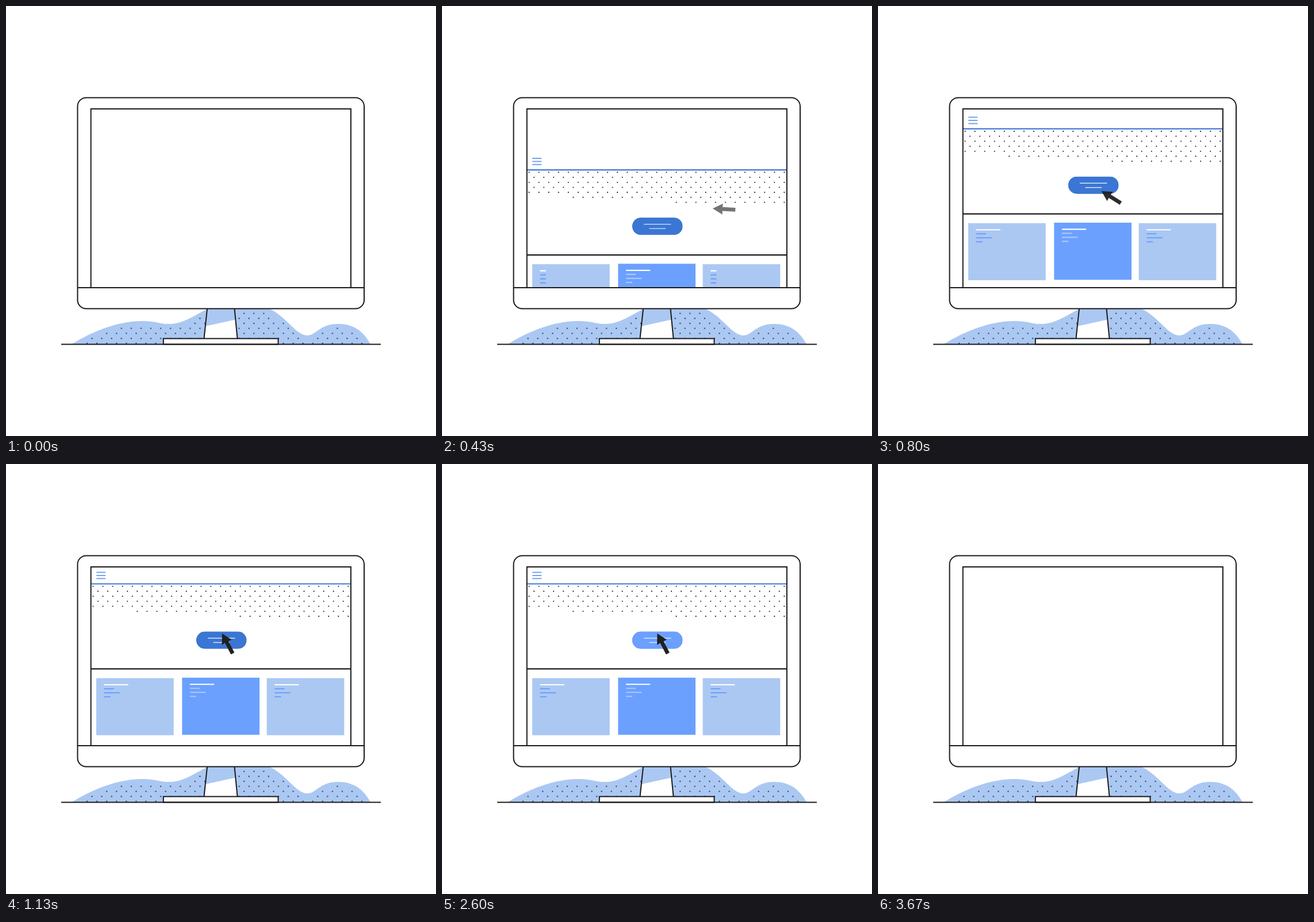
An HTML page with a canvas for the animation above (4.63 s loop, 748 by 748 pixels).

```html
<!DOCTYPE html>
<html lang="en">
<head>
<meta charset="utf-8">
<title>Desktop page</title>
<style>
  html, body { margin: 0; width: 100%; height: 100%; overflow: hidden; background: #fff; }
  canvas { display: block; width: 100vw; height: 100vh; }
</style>
</head>
<body>
<canvas id="stage" width="748" height="748"></canvas>
<script>
const ctx = document.getElementById('stage').getContext('2d');
const LOOP = 4630;
const INK = '#1a1a1a', PALE = '#abc8f3', BLUE = '#6ba0ff', DEEP = '#3b76d4';
const PITCH = 17.07, ROW = 8.7;

const HILLS = 'M115 588C150 566 195 548 237 548C262 548 268 554 288 553C312 551 330 537 350 527' +
  'L459 527C488 541 505 573 524 573C540 573 545 553 578 553C610 553 625 572 634 588Z';
const hills = new Path2D(HILLS);

const clamp = x => Math.max(0, Math.min(1, x));
const span = (t, from, to) => clamp((t - from) / (to - from));
const mix = (a, b, k) => a + (b - a) * k;

function line(x1, y1, x2, y2, color = INK, width = 2, cap = 'butt') {
  ctx.strokeStyle = color;
  ctx.lineWidth = width;
  ctx.lineCap = cap;
  ctx.beginPath();
  ctx.moveTo(x1, y1);
  ctx.lineTo(x2, y2);
  ctx.stroke();
}

function rect(x, y, w, h, color) {
  ctx.fillStyle = color;
  ctx.fillRect(x, y, w, h);
}

function poly(points, color) {
  ctx.fillStyle = color;
  ctx.beginPath();
  points.forEach(([x, y]) => ctx.lineTo(x, y));
  ctx.closePath();
  ctx.fill();
}

function roundRect(x, y, w, h, r) {
  ctx.beginPath();
  ctx.roundRect(x, y, w, h, r);
}

// Staggered dots: odd rows are shifted by half a pitch.
function dots(x0, y0, cols, rows, r, color, keep = () => true) {
  ctx.fillStyle = color;
  for (let j = 0; j < rows; j++) {
    for (let i = 0; i < cols; i++) {
      const x = x0 + (i + (j % 2) / 2) * PITCH, y = y0 + j * ROW;
      if (!keep(x, y)) continue;
      ctx.beginPath();
      ctx.arc(x, y, r, 0, 7);
      ctx.fill();
    }
  }
}

function drawBase() {
  ctx.fillStyle = PALE;
  ctx.fill(hills);
  dots(124, 534.7, 31, 7, 1.3, '#45577f', (x, y) => ctx.isPointInPath(hills, x, y - 7.5));

  poly([[350, 527], [397.5, 527], [402.5, 578], [344.5, 578]], '#fff');
  poly([[350, 527], [397.5, 527], [399.5, 545.5], [346.8, 557]], PALE);
  line(350, 527, 344.5, 578);
  line(397.5, 527, 402.5, 578);

  rect(273.5, 578.5, 200, 10, '#fff');
  ctx.strokeStyle = INK;
  ctx.lineWidth = 2;
  ctx.strokeRect(273.8, 578.5, 199.7, 10);
  line(96, 588.5, 652, 588.5);
}

function drawMonitor() {
  ctx.strokeStyle = INK;
  ctx.lineWidth = 2;
  roundRect(124.5, 159.5, 498.5, 367, 15);
  ctx.stroke();
  ctx.strokeRect(147.7, 179, 452.2, 311);
  line(124.5, 490, 623, 490);
}

function drawCard(x, y, fill, first, rest, reveal) {
  rect(x, y, 134.7, 99.3, fill);
  [42, 17, 27.5, 11].forEach((len, i) => {
    const w = Math.min(len, reveal);
    if (w < 1) return;
    const ly = y + 11.5 + i * 7;
    line(x + 14.5, ly, x + 13 + w, ly, i ? rest : first, 2.1, 'round');
  });
}

function drawButton(press, lit) {
  const x = 331, y = 291.5, w = 87.5, h = 30;
  ctx.save();
  roundRect(x, y, w, h, h / 2);
  ctx.clip();
  rect(x, y, w, h, '#315fa8');
  const rgb = [[59, 107], [118, 160], [212, 255]].map(([a, b]) => Math.round(mix(a, b, lit)));
  ctx.fillStyle = `rgb(${rgb})`;
  roundRect(x, y + press, w, h, h / 2);
  ctx.fill();
  line(351, 303 + press, 398.5, 303 + press, '#d6e4ff', 1.4);
  line(360.5, 310.5 + press, 389, 310.5 + press, '#d6e4ff', 1.4);
  ctx.restore();
}

function drawPage(t, press) {
  const offset = 311 * (1 - span(t, 57, 1057)) ** 3;
  const fade = span(t, 2590, 3330);
  ctx.save();
  ctx.beginPath();
  ctx.rect(148, 180, 451.5, 309.5);
  ctx.clip();
  ctx.globalAlpha = (1 + Math.cos(Math.PI * fade)) / 2;
  ctx.translate(0, offset);

  for (const y of [188.4, 193.9, 199.2]) line(158, y, 172.5, y, '#74a3f0', 2, 'round');
  line(147, 208.5, 600, 208.5, '#3f79d6', 2.2);
  dots(151.5, 212.7, 27, 8, 1.05, '#222', (x, y) => y < 256.2 + (x - 213) * 0.0462);
  drawButton(press, span(t, 1600, 1800));
  line(147, 356.4, 600, 356.4, INK, 2.2);

  const reveal = mix(0, 42, span(t, 343, 710));
  drawCard(157, 372.5, PALE, '#fff', '#6d9ffc', reveal);
  drawCard(306.3, 371.7, BLUE, '#fff', '#abc8f8', 42);
  drawCard(453.6, 372.5, PALE, '#fff', '#6d9ffc', reveal);
  ctx.restore();
}

// Position and heading on the pointer's path; u = 0 is the resting place.
function pathAt(u) {
  const v = 1 - u, a = [20, 38], c = [110, 57], d = [255, 27];
  const pos = i => 3 * u * v * v * a[i] + 3 * u * u * v * c[i] + u ** 3 * d[i];
  const vel = i => v * v * a[i] + 2 * u * v * (c[i] - a[i]) + u * u * (d[i] - c[i]);
  return { x: 385 + pos(0), y: 312 + pos(1), angle: Math.atan2(vel(1), vel(0)) };
}

function drawPointer(t, press) {
  const away = t < 2000 ? 1 - span(t, 110, 1110) : span(t, 2600, 3660);
  if (away >= 1) return;
  const p = pathAt(away ** 1.37);
  const settle = 1.5 * span(t, 1600, 2130);
  ctx.save();
  ctx.globalAlpha = 1 - away ** 2.5;
  ctx.translate(p.x - press * 0.8 - settle * (1 - away), p.y + press);
  ctx.rotate(p.angle);
  ctx.translate(-19.5, 0);
  poly([[0, 0], [17.5, -9.5], [17, -3.4], [39.5, -3.4], [39.5, 3.4], [17, 3.4], [17.5, 9.5]], '#202020');
  ctx.restore();
}

// Short pauses in the motion: start and length.
const HOLDS = [[430, 100], [1870, 100], [2600, 70]];

function draw(now) {
  let t = now % LOOP;
  for (const [at, len] of HOLDS) if (t >= at && t < at + len) t = at;
  const press = 5.2 * Math.sin(Math.PI * span(t, 1600, 2130) ** 0.71);

  rect(0, 0, 748, 748, '#fff');
  drawBase();
  if (t >= 70 && t < 3670) drawPage(t, press);
  drawMonitor();
  if (t >= 70 && t < 3670) drawPointer(t, press);
}

const start = performance.now();
function tick() {
  draw(performance.now() - start);
  requestAnimationFrame(tick);
}
tick();
</script>
</body>
</html>
```
